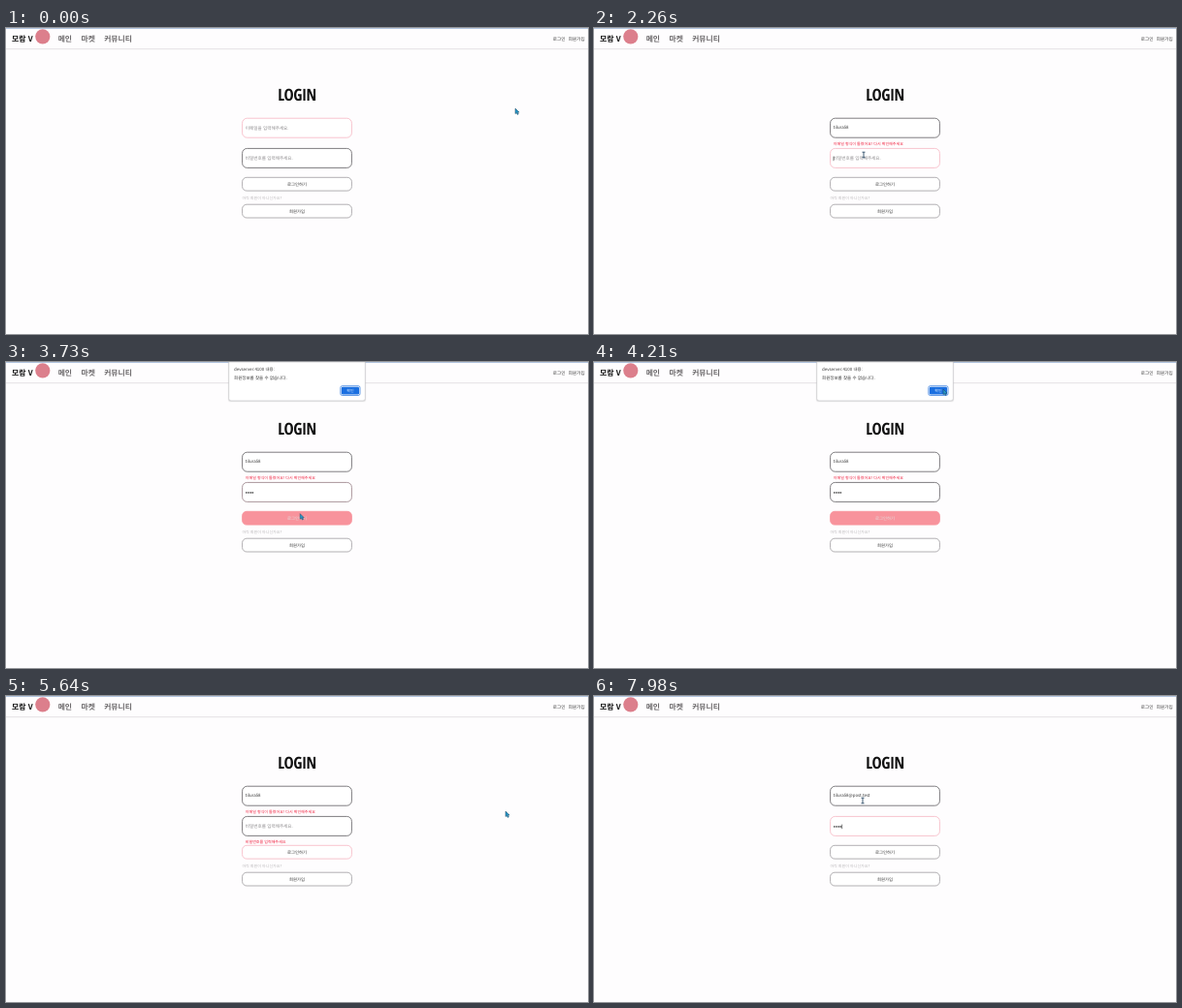
An HTML page that plays this animation: 600 px wide and 316 px high, repeating every 8 s.

```html
<!DOCTYPE html>
<html lang="ko">
<head>
<meta charset="utf-8">
<title>Login</title>
<style>
  html, body { margin: 0; width: 100%; height: 100%; overflow: hidden; background: #fefdfe; }
  svg { display: block; width: 100%; height: 100%; }
  text { font: 4.6px "Noto Sans CJK KR", "Noto Sans CJK", sans-serif; fill: #333; text-rendering: geometricPrecision; white-space: pre; }
  .brand { font-size: 7.9px; font-weight: 900; fill: #111; }
  .menu { font-size: 7.8px; font-weight: 800; fill: #6a6769; }
  .title { font: 300 17px "Open Sans Condensed", "Roboto Condensed", "Open Sans", sans-serif; font-stretch: condensed; letter-spacing: -.5px; fill: #111; }
  .mid { text-anchor: middle; }
  .hint { fill: #8b898b; }
  .small { font-size: 4px; }
  .error { fill: #f0213f; }
  .button { font-size: 4.35px; }
  .dots { font: 6.2px "Liberation Sans", sans-serif; }
  .box { fill: #fff; stroke-width: .85; }
</style>
</head>
<body>
<svg viewBox="0 0 600 316">
  <rect width="600" height="316" fill="#fefdfe"/>
  <path d="M0 .4H600" stroke="#a9bfdc"/>
  <path d="M0 21.7H600" stroke="#dddadd" stroke-width=".8"/>
  <text class="brand" x="6" y="14">모람 V</text>
  <circle cx="37.8" cy="8.8" r="7.6" fill="#dc7f8c"/>
  <g class="menus">
    <text class="menu" x="53.7" y="14">메인</text>
    <text class="menu" x="77.6" y="14">마켓</text>
    <text class="menu" x="101.2" y="14">커뮤니티</text>
  </g>
  <text x="563.8" y="12.9" font-weight="500">로그인</text>
  <text x="579.8" y="12.9" font-weight="500">회원가입</text>
  <text class="title mid" x="300" y="74.8">LOGIN</text>

  <rect id="emailBox" class="box" x="243.6" y="93.2" width="112.8" height="20" rx="5"/>
  <text id="emailHint" class="hint" x="246.8" y="104.6">이메일을 입력해주세요.</text>
  <text id="email" x="246.8" y="104.4" style="font-size:4.4px"></text>
  <text id="emailError" class="small error" x="246.8" y="120.8">이메일 형식이 틀렸어요! 다시 확인해주세요</text>

  <rect id="passBox" class="box" x="243.6" y="124.4" width="112.8" height="20" rx="5"/>
  <text id="passHint" class="hint" x="246.8" y="136.1">비밀번호를 입력해주세요.</text>
  <text id="pass" class="dots" x="246.8" y="137.3"></text>
  <text id="passError" class="small error" x="246.8" y="152.3">비밀번호를 입력해주세요</text>
  <path id="caret" stroke="#222" stroke-width=".6"/>

  <rect id="loginBox" class="box" x="243.6" y="154.3" width="112.8" height="13.8" rx="4.5"/>
  <text id="loginText" class="button mid" x="300" y="162.9">로그인하기</text>
  <text class="small" style="fill:#b9b6b9" x="243.4" y="176.6">아직 회원이 아니신가요?</text>
  <rect class="box" x="243.6" y="182.2" width="112.8" height="13.8" rx="4.5" stroke="#a3a1a4"/>
  <text class="button mid" x="300" y="190.8">회원가입</text>

  <g id="alert">
    <path d="M228.8 0V38.4Q228.8 41.2 231.6 41.2H368.4Q371.2 41.2 371.2 38.4V0Z" fill="#000" opacity=".09"/>
    <path d="M229.7 0V37.6Q229.7 40 232 40H368Q370.3 40 370.3 37.6V0Z" fill="#fff" stroke="#c3c3c6" stroke-width=".6"/>
    <text x="235" y="9.4" style="font-size:4.4px">devserver:4100 내용:</text>
    <text x="235" y="18.3" style="font-size:4.5px">회원정보를 찾을 수 없습니다.</text>
    <rect x="344.8" y="24.7" width="20.2" height="9.8" rx="1.8" fill="#fff" stroke="#3b82e0" stroke-width=".8"/>
    <rect x="345.8" y="25.7" width="18.2" height="7.8" rx="1.2" fill="#1a6fe0"/>
    <text class="mid" x="354.9" y="31.2" style="font-size:4px;fill:#dcebff">확인</text>
  </g>

  <g id="pointer">
    <path id="arrow" d="M0 0V5.6L1.3 4.5L2.2 6.4L3.3 5.9L2.5 4.1H4.1Z" fill="#2597c8" stroke="#1d4660" stroke-width=".5"/>
    <path id="beam" d="M-1.5 -2.8H1.5M0 -2.8V2.8M-1.5 2.8H1.5" fill="none" stroke="#2b4a66" stroke-width=".9"/>
    <path id="hand" d="M-.6 0Q0 -.7 .6 0V2.2L3 2.9Q3.7 3.3 3.4 4.6L2.7 6.6H-.6L-2 4.2Q-1.7 3.2 -.6 3.8Z" fill="#2597d8" stroke="#1d4660" stroke-width=".5"/>
  </g>
</svg>
<script>
const LOOP = 8000, FADE = 110;
const $ = Object.fromEntries([...document.querySelectorAll('[id]')].map(el => [el.id, el]));
const PINK = [247, 186, 198], DARK = [104, 102, 106], GREY = [163, 161, 164];
const WHITE = [255, 255, 255], HOVER = [248, 147, 156], INK = [51, 51, 51];

// Pointer stops: time, x, y
const path = [
  [50, 525, 83], [440, 281, 129], [650, 281, 129], [910, 278, 131],
  [3300, 278, 131], [3470, 303, 157], [3720, 303, 157], [4080, 360, 28],
  [4270, 360, 28], [4600, 174, 134], [4900, 174, 134], [4940, 177, 131],
  [5160, 177, 131], [5380, 229, 158], [5450, 264, 160], [5510, 270, 160],
  [5640, 515, 119], [5770, 523, 120], [5980, 523, 120], [6300, 277, 108]
];
const firstPass = [2520, 2780, 2900, 3030], secondPass = [7760, 7820, 7870, 7920];
const emailKeys = [...'tilura58@post.test'].map((char, i) =>
  [i < 8 ? 1170 + i * 70 : 6630 + (i - 8) * 82, char]);

const clamp = v => Math.min(1, Math.max(0, v));
const within = (t, ...spans) => spans.some(([a, b]) => t >= a && t < b);
const fade = (t, ...spans) => Math.max(...spans.map(([a, b]) =>
  Math.min(clamp((t - a) / FADE), clamp(1 - (t - b) / FADE))));
const mix = (a, b, k) => `rgb(${a.map((v, i) => Math.round(v + (b[i] - v) * k))})`;
const show = (el, on) => el.style.display = on ? '' : 'none';

function pointerAt(t) {
  const i = path.findIndex(p => p[0] > t);
  if (i === 0) return path[0].slice(1);
  if (i < 0) return path[path.length - 1].slice(1);
  const [t0, x0, y0] = path[i - 1], [t1, x1, y1] = path[i];
  const u = (t - t0) / (t1 - t0), k = u * u * (3 - 2 * u);
  return [x0 + (x1 - x0) * k, y0 + (y1 - y0) * k];
}

function drawPointer(t) {
  const [x, y] = pointerAt(t);
  const inRow = (top, bottom) => x > 243 && x < 357 && y > top && y < bottom;
  const beam = inRow(93, 114) || inRow(124, 145);
  const hand = inRow(154, 169) && !within(t, [3660, 4260]);
  show($.pointer, !within(t, [1170, 1910], [2780, 3300], [6630, 7970]));
  show($.beam, beam);
  show($.hand, hand);
  show($.arrow, !beam && !hand);
  $.pointer.setAttribute('transform', `translate(${x} ${y})`);
}

function drawCaret(t, inEmail, inPass) {
  const resets = [-600, 1950, 4260, 6350, 7480, ...firstPass, ...secondPass, ...emailKeys.map(k => k[0])];
  const last = Math.max(...resets.filter(r => r <= t));
  const field = inEmail ? $.email : $.pass, y = inEmail ? 100.6 : 132.6;
  show($.caret, (inEmail || inPass) && (t - last) % 1000 < 500);
  const x = 247 + (field.textContent ? field.getComputedTextLength() : 0);
  $.caret.setAttribute('d', `M${x} ${y}v4.6`);
}

function draw(t) {
  const emailFocus = [[-500, 1950], [6350, 7460]];
  const passFocus = [[1950, 3660], [4260, 5500], [7460, 9000]];
  const loginFocus = [5500, 6350];

  $.email.textContent = emailKeys.filter(k => k[0] <= t).map(k => k[1]).join('');
  const keys = t < 4260 ? firstPass : secondPass;
  $.pass.textContent = '•'.repeat(keys.filter(k => k <= t).length);
  show($.emailHint, !$.email.textContent);
  show($.passHint, !$.pass.textContent);
  show($.emailError, within(t, [1960, 7490]));
  show($.passError, within(t, [5520, 7760]));
  show($.alert, within(t, [3680, 4260]));

  $.emailBox.style.stroke = mix(DARK, PINK, fade(t, ...emailFocus));
  $.passBox.style.stroke = mix(DARK, PINK, fade(t, ...passFocus));

  const hover = fade(t, [3460, 4260], [5440, 5525]);
  $.loginBox.style.fill = mix(WHITE, HOVER, hover);
  $.loginBox.style.stroke = hover > 0 ? mix(WHITE, HOVER, hover) : mix(GREY, PINK, fade(t, loginFocus));
  $.loginText.style.fill = mix(INK, WHITE, hover * .85);

  drawCaret(t, within(t, ...emailFocus), within(t, ...passFocus));
  drawPointer(t);
}

const start = performance.now();
function tick() {
  draw((performance.now() - start) % LOOP);
  requestAnimationFrame(tick);
}
tick();
</script>
</body>
</html>
```
